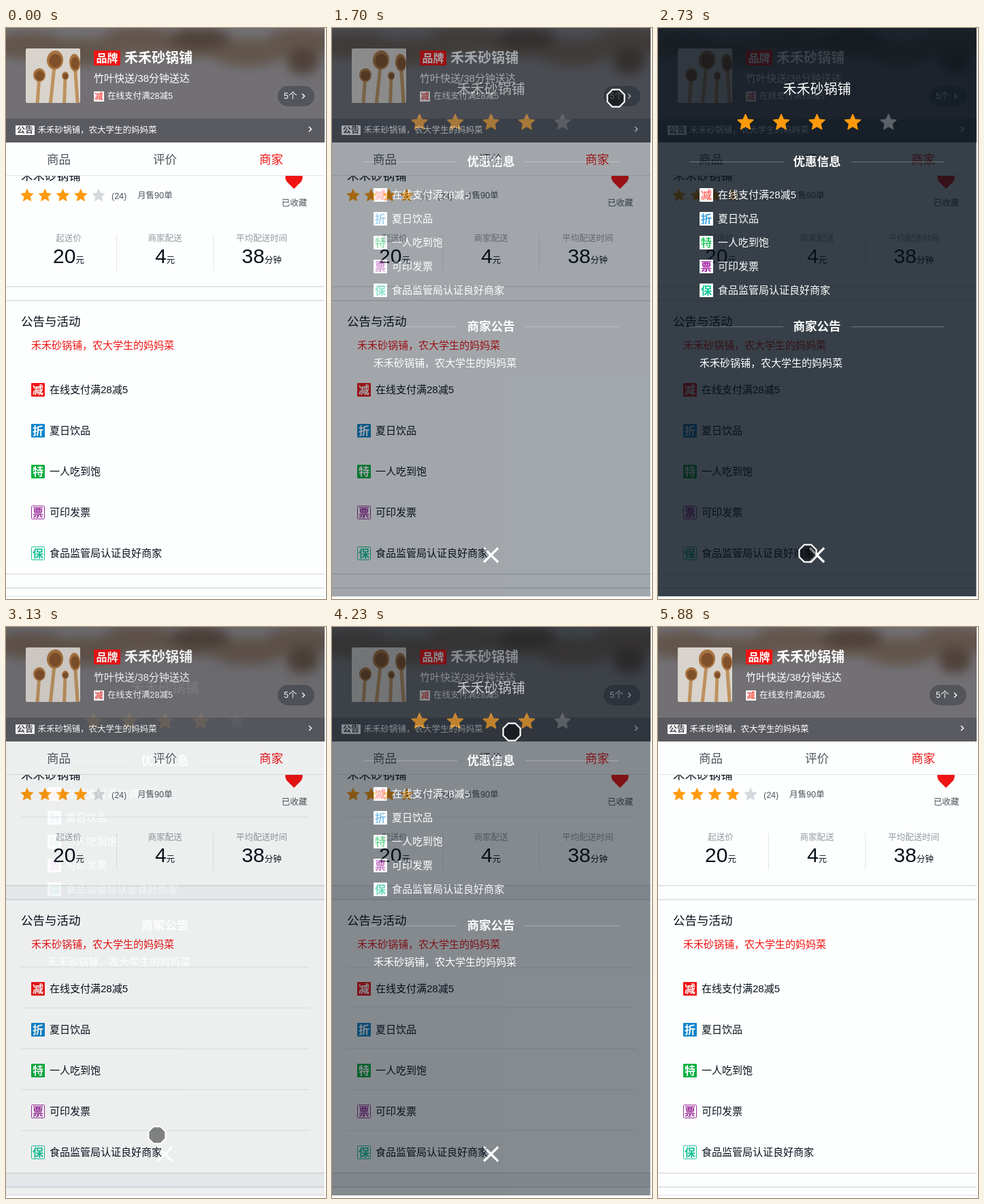
An HTML page that plays this animation: 470x838 px, repeating every 7.53 s.

```html
<!DOCTYPE html>
<html lang="zh">
<head>
<meta charset="utf-8">
<title>商家</title>
<style>
html, body { margin: 0; width: 100%; height: 100%; overflow: hidden; background: #fff; }
svg { display: block; width: 100%; height: 100%; }
text { font-family: 'Liberation Sans', 'Noto Sans CJK SC', 'Noto Sans CJK', sans-serif; white-space: pre; }
#page { font-weight: 300; }
</style>
</head>
<body>
<svg id="stage" viewBox="0 0 470 838"></svg>
<script>
const LOOP = 7530;
const SHOP = '禾禾砂锅铺';
const NOTICE = SHOP + '，农大学生的妈妈菜';
const INK = '#07111b', GREY = '#4d555d', PALE = '#93999f', RED = '#f01414';
const OFFERS = [
  { char: '减', label: '在线支付满28减5', color: RED, bright: '#ff706c', solid: true },
  { char: '折', label: '夏日饮品', color: '#0f86cc', bright: '#3a9fe2', solid: true },
  { char: '特', label: '一人吃到饱', color: '#0bb040', bright: '#2ecb66', solid: true },
  { char: '票', label: '可印发票', color: '#9a2c9a', bright: '#a01fa0' },
  { char: '保', label: '食品监管局认证良好商家', color: '#14c296', bright: '#10c898' }
];
const BOLD = 'font-weight="700"';
const range = n => [...Array(n).keys()];

// y is the optical middle of the line
const text = (x, y, size, str, fill = INK, extra = '') =>
  `<text x="${x}" y="${y + size * 0.37}" font-size="${size}" fill="${fill}" ${extra}>${str}</text>`;
const mid = (x, y, size, str, fill, extra = '') =>
  text(x, y, size, str, fill, 'text-anchor="middle" ' + extra);
const rect = (x, y, w, h, fill, extra = '') =>
  `<rect x="${x}" y="${y}" width="${w}" height="${h}" fill="${fill}" ${extra}/>`;
const oval = (x, y, rx, ry, fill) =>
  `<ellipse cx="${x}" cy="${y}" rx="${rx}" ry="${ry}" fill="${fill}"/>`;
const path = (d, stroke, width) =>
  `<path d="${d}" fill="none" stroke="${stroke}" stroke-width="${width}"/>`;

function polygon(cx, cy, n, radius, turn) {
  return range(n).map(i => {
    const a = turn + i * 2 * Math.PI / n, r = radius(i);
    return (cx + r * Math.cos(a)).toFixed(2) + ',' + (cy + r * Math.sin(a)).toFixed(2);
  }).join(' ');
}

function stars(x, y, gap, r, off) {
  return range(5).map(i => {
    const fill = i < 4 ? '#ff9a0c' : off;
    const pts = polygon(x + i * gap, y + r * 0.06, 10, k => k % 2 ? r * 0.47 : r, -Math.PI / 2);
    return `<polygon points="${pts}" fill="${fill}" stroke="${fill}" stroke-width="${r * 0.1}" stroke-linejoin="round"/>`;
  }).join('');
}

function badge(x, y, size, char, color, solid, border) {
  const inset = border ? 0.5 : 0, side = size - 2 * inset;
  return rect(x + inset, y + inset, side, side, solid ? color : '#fff', `rx="1" stroke="${border ? color : 'none'}"`) +
    mid(x + size / 2, y + size / 2, size * 0.8, char, solid ? '#fff' : color, BOLD);
}

function spoon(x, y, rx, ry, tilt) {
  return `<g transform="translate(${x} ${y}) rotate(${tilt})">` +
    rect(-2.5, 0, 5, 70, '#bd925f') + oval(0, 0, rx, ry, '#a8733f') +
    oval(0.5, 1, rx * 0.75, ry * 0.72, '#80502a') + '</g>';
}

function header() {
  const clouds = range(6).map(i => oval(35 + 80 * i, 26 + 10 * Math.sin(2 * i), 55, 20, '#62544b')).join('');
  return `<g clip-path="url(#head)">` + rect(0, 0, 468, 168, '#727074') +
    `<g filter="url(#soft)">` + clouds + oval(285, 16, 45, 16, '#50423a') + oval(436, 48, 24, 20, '#50423a') + '</g>' +
    rect(0, 133, 468, 35, 'rgba(7,17,27,.22)') + '</g>' +
    `<g clip-path="url(#photo)">` + rect(29, 30, 80, 80, '#d9d3cd') +
    spoon(72, 47, 12, 14, 6) + spoon(49, 69, 9, 10, 4) + spoon(101, 51, 8, 13, -4) + spoon(87, 70, 5, 6, 2) + '</g>' +
    rect(129, 33, 39, 22, RED, 'rx="1"') + mid(148.5, 44, 16, '品牌', '#fff', BOLD) +
    text(174, 44, 20, SHOP, '#fff', BOLD) +
    text(129, 73.5, 15, '竹叶快送/38分钟送达', '#fff') +
    badge(129, 93, 15, '减', '#f2504c') +
    text(149, 99.5, 12.5, '在线支付满28减5', '#fff') +
    rect(399, 85, 54, 30, 'rgba(7,17,27,.28)', 'rx="15"') +
    text(408, 99.5, 12.5, '5个', '#fff') +
    path('M435 96.5l3.5 3.5l-3.5 3.5M445 145l3.5 3.5l-3.5 3.5', '#fff', 1.5) +
    rect(14, 143, 28, 14, '#fff', 'rx="1"') + mid(28, 150, 12, '公告', '#4b4b50', BOLD) +
    text(46.5, 149, 12.5, NOTICE, '#fff');
}

function stat(x, label, value, unit) {
  return mid(x, 308, 12.5, label, PALE) +
    `<text x="${x}" y="344.5" text-anchor="middle" font-size="30" fill="${INK}">${value}<tspan font-size="12.5">${unit}</tspan></text>`;
}

function page() {
  const rules = 'M22 279H446' + range(5).map(i => `M22 ${499 + 60 * i}H446`).join('');
  return rect(0, 168, 468, 666, '#fdfefe') +
    `<g id="rules">` + rect(0, 380, 468, 20, '#f3f5f7') + rect(0, 802, 468, 20, '#f3f5f7') +
    path(rules, '#eceeef', 1.5) + '</g>' +
    text(22, 216.5, 17.5, SHOP) +
    stars(31, 245.5, 26.25, 9.5, '#d5d8dc') +
    text(155, 246, 12.5, '(24)', GREY) + text(193, 245.5, 12.5, '月售90单', GREY) +
    `<path fill="${RED}" d="M423 236L412.5 225.5C408 219 411 212 417 212C420 212 422 214 423 216C424 214 426 212 429 212C435 212 438 219 433.5 225.5Z"/>` +
    mid(423.5, 256, 12.5, '已收藏', GREY) +
    stat(92, '起送价', '20', '元') + stat(233.5, '商家配送', '4', '元') + stat(375.5, '平均配送时间', '38', '分钟') +
    path('M162.5 303V356M304.5 303V356', '#e3e6e8', 1) +
    path('M0 379.5H468M0 400H468M0 801.5H468M0 822H468', '#d9dddf', 1.5) +
    path('M0 834H468', '#dcdcdc', 1) +
    text(22, 430.5, 17.5, '公告与活动') +
    text(37, 465, 15, NOTICE, RED) +
    OFFERS.map((o, i) => badge(37, 521 + 60 * i, 20, o.char, o.color, o.solid, !o.solid) +
      text(64, 530.3 + 60 * i, 15, o.label)).join('') +
    rect(0, 168, 468, 48, '#fdfefe') + path('M0 216.5H468', '#e2e5e7', 1) +
    ['商品', '评价', '商家'].map((s, i) => mid(77.5 + 156 * i, 193, 17.5, s, i < 2 ? GREY : RED)).join('');
}

function heading(y, str) {
  return path(`M46 ${y + 0.5}H184M284 ${y + 0.5}H421`, 'rgba(255,255,255,.28)', 1) +
    mid(233.5, y, 17.5, str, '#fff', BOLD);
}

function detail() {
  return rect(0, 0, 467.5, 834, 'rgba(7,17,27,.8)') +
    mid(233.5, 90, 20, SHOP, '#fff') +
    stars(128.5, 138, 52.5, 12.2, '#5b6268') +
    heading(196, '优惠信息') +
    OFFERS.map((o, i) => badge(61, 235 + 35 * i, 20, o.char, o.bright) +
      text(88, 244.5 + 35 * i, 15, o.label, '#fff')).join('') +
    heading(438, '商家公告') +
    text(61, 491.5, 15, NOTICE, '#fff') +
    path('M223 763l21 21M244 763l-21 21', '#fff', 3.2);
}

document.getElementById('stage').innerHTML = `
<defs>
  <filter id="soft" x="-20%" y="-40%" width="140%" height="180%"><feGaussianBlur stdDeviation="8"/></filter>
  <clipPath id="head"><rect width="468" height="168"/></clipPath>
  <clipPath id="photo"><rect x="29" y="30" width="80" height="80" rx="2"/></clipPath>
</defs>
<g id="page">${page()}</g>${header()}
<g id="detail">${detail()}</g>
<polygon id="touch" points="${polygon(0, 0, 8, () => 13.6, Math.PI / 8)}" fill="rgba(0,0,0,.46)" stroke="#fff" stroke-width="2.2"/>`;

const [rulesEl, detailEl, touchEl] = ['rules', 'detail', 'touch'].map(id => document.getElementById(id));

// The picture is refreshed in even beats; all motion is timed in beats
const BEAT = 139, FIRST = 725, GLIDE = 3.6, FADE = 3.7;
const ramp = (k, start, length) => Math.min(1, Math.max(0, (k - start) / length));
const easeOut = u => 1 - (1 - u) ** 3;

const ENTRY = { x: 486, y: 410 };
const GLIDES = [
  { start: -0.6, x: 417, y: 103 },
  { start: 8.96, x: 220, y: 771 },
  { start: 16.95, x: 264, y: 154 },
  { start: 26, x: 223, y: 777 },
  { start: 34.9, x: 222, y: 860 }
];

function touchAt(k) {
  return GLIDES.reduce((from, to) => {
    const p = easeOut(ramp(k, to.start, GLIDE));
    return { x: from.x + (to.x - from.x) * p, y: from.y + (to.y - from.y) * p };
  }, ENTRY);
}

const detailOpacity = k =>
  ramp(k, 5.3, FADE) - ramp(k, 15, 2.17) + ramp(k, 22.75, FADE) - ramp(k, 33.2, FADE);

function draw(t) {
  const k = Math.floor((t - FIRST) / BEAT);
  const { x, y } = touchAt(k);
  detailEl.setAttribute('opacity', detailOpacity(k).toFixed(3));
  touchEl.setAttribute('transform', `translate(${x.toFixed(1)} ${y.toFixed(1)})`);
  rulesEl.setAttribute('opacity', k >= 16 && k < 37 ? 1 : 0);
}

const start = performance.now();
function tick() {
  draw((performance.now() - start) % LOOP);
  requestAnimationFrame(tick);
}
tick();
</script>
</body>
</html>
```
